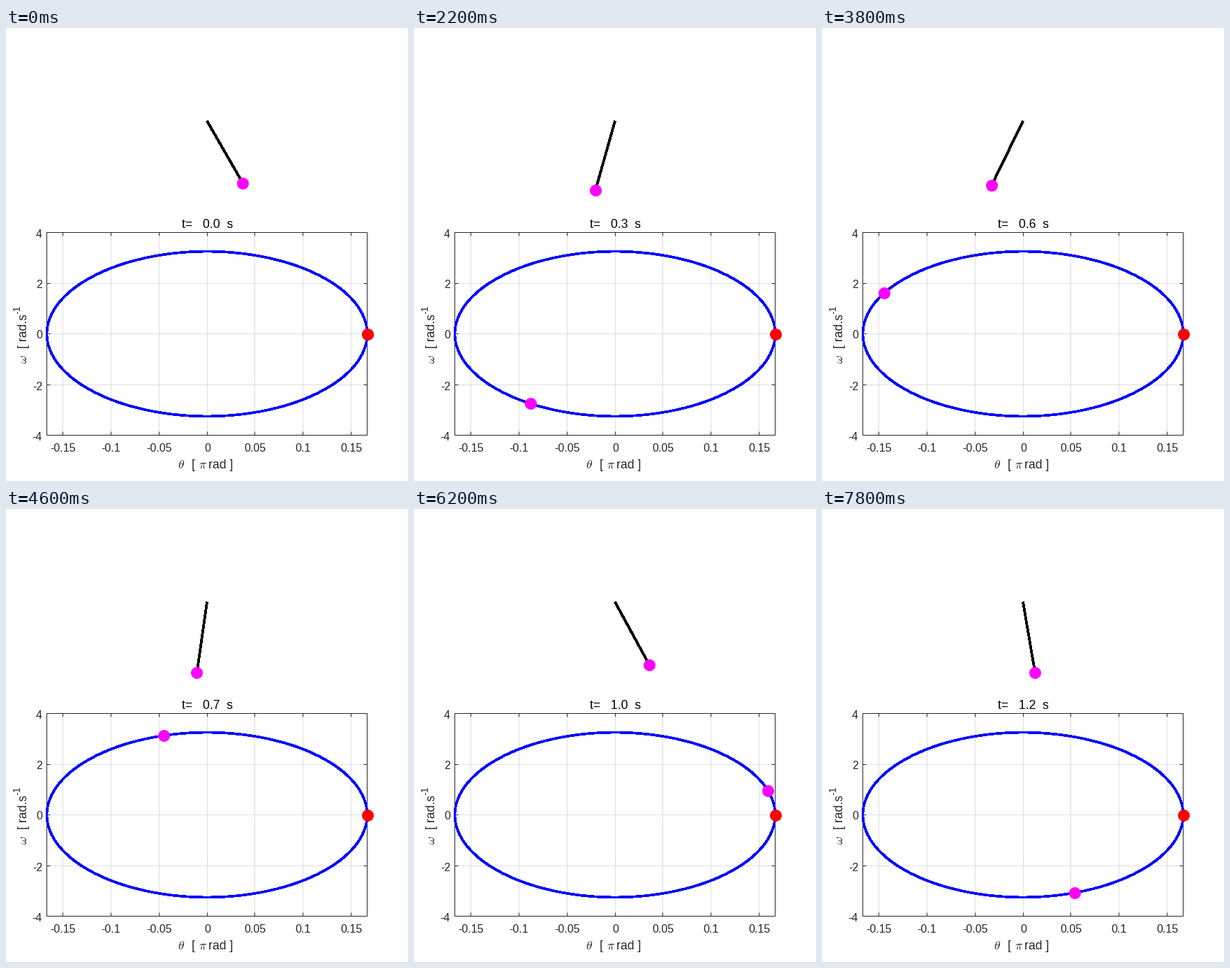
These frames come from a looping animation (576 px wide and 648 px high, 8000 ms). A matplotlib script:

```python
import math

import matplotlib.pyplot as plt
import numpy as np
from matplotlib.animation import FuncAnimation

W, H, DPI = 576, 648, 100
PX = 72 / DPI                      # points per pixel
FRAMES, INTERVAL = 40, 200
DT, SUB = 1 / 32, 40               # simulated seconds per frame, solver substeps
W0 = 2 * math.pi
AMP = math.pi / 6

LEFT, RIGHT, TOP, BOTTOM = 58, 517, 292, 582
CX, CY = (LEFT + RIGHT) / 2, (TOP + BOTTOM) / 2
X_UNIT = (RIGHT - LEFT) * 3        # pixels per pi rad
Y_UNIT = (BOTTOM - TOP) / 8        # pixels per rad/s
PIVOT, ROD = (CX, 132.5), 102.5
INK, GRID, MAGENTA = "#262626", "#dedede", "#ff00ff"

plt.rcParams["font.family"] = "Liberation Sans"
plt.rcParams["mathtext.fontset"] = "cm"


def swing():
    """Angle and angular speed of the pendulum at every frame (RK4)."""
    def rate(s):
        return np.array([s[1], -W0 ** 2 * math.sin(s[0])])

    s, h, path = np.array([AMP, 0.0]), DT / SUB, []
    for _ in range(FRAMES):
        path.append(s)
        for _ in range(SUB):
            a = rate(s)
            b = rate(s + h / 2 * a)
            c = rate(s + h / 2 * b)
            d = rate(s + h * c)
            s = s + h / 6 * (a + 2 * b + 2 * c + d)
    return path


def phase_xy(theta, omega):
    return CX + theta / math.pi * X_UNIT, CY - omega * Y_UNIT


def pixel(v):
    return math.floor(v + 0.5)


# Whole coordinates are pixel centres
fig = plt.figure(figsize=(W / DPI, H / DPI), dpi=DPI, facecolor="white")
ax = fig.add_axes([0, 0, 1, 1])
ax.set_xlim(-0.5, W - 0.5)
ax.set_ylim(H - 0.5, -0.5)
ax.axis("off")


def line(xs, ys, color=INK, width=1.0, z=1, **kw):
    return ax.plot(xs, ys, color=color, lw=width * PX, zorder=z,
                   clip_on=False, snap=False, **kw)[0]


def dot(x, y, color, z):
    return ax.plot([x], [y], "o", ms=17 * PX, mfc=color, mec="none", zorder=z,
                   clip_on=False, snap=False, antialiased=False)[0]


def label(x, y, s, size=17.6, color=INK, ha="left", rot=0):
    return ax.text(x, y, s, fontsize=size * PX, color=color, ha=ha,
                   va="baseline", rotation=rot, rotation_mode="anchor")


# Grid, ticks and tick labels
TICK = 4.5
for k in range(-3, 4):
    x = pixel(CX + k * 0.05 * X_UNIT)
    line([x, x], [TOP, BOTTOM], GRID, z=0)
    line([x, x], [BOTTOM, BOTTOM - TICK])
    line([x, x], [TOP, TOP + TICK])
    label(x, 606, f"{k * 0.05:.2f}".rstrip("0").rstrip(".") if k else "0",
          16, ha="center")
for v in range(-4, 5, 2):
    y = pixel(CY - v * Y_UNIT)
    if abs(v) < 4:
        line([LEFT, RIGHT], [y, y], GRID, z=0)
        line([LEFT, LEFT + TICK], [y, y])
        line([RIGHT, RIGHT - TICK], [y, y])
    label(51.5, y + 7, str(v), 16, ha="right")
line([LEFT, RIGHT, RIGHT, LEFT, LEFT], [TOP, TOP, BOTTOM, BOTTOM, TOP],
     solid_joinstyle="miter")

# Axis labels
label(245.5, 629, r"$\theta$")
label(265, 629, "[")
label(275, 629, r"$\pi$")
label(290, 629, "rad ]")
label(29, 479, r"$\omega$", rot=90)
label(29, 458, "[ rad.s", rot=90)
label(20, 408.5, "-1", 14, rot=90)

# Closed phase curve from energy conservation
th = AMP * np.cos(np.linspace(0, 2 * np.pi, 721))
speed = W0 * np.sqrt(np.maximum(2 * (np.cos(th) - math.cos(AMP)), 0))
speed[361:] *= -1
line(*phase_xy(th, speed), color="#0000ff", width=2.67, z=2,
     antialiased=False)

title = label(288, 285, "", color="black", ha="center")
rod = line([], [], "black", 2.67, 3, solid_capstyle="butt", antialiased=False)
bob = dot(0, 0, MAGENTA, 4)
state = dot(0, 0, MAGENTA, 4)
dot(*phase_xy(AMP, 0), "#ff0000", 5)

path = swing()


def update(i):
    theta, omega = path[i]
    x = PIVOT[0] + ROD * math.sin(theta)
    y = PIVOT[1] + ROD * math.cos(theta)
    rod.set_data([PIVOT[0], x], [PIVOT[1], y])
    bob.set_data([x], [y])
    px, py = phase_xy(theta, omega)
    state.set_data([px], [py])
    title.set_text(f"t=   {i * DT:.1f}  s")
    return rod, bob, state, title


anim = FuncAnimation(fig, update, frames=FRAMES, interval=INTERVAL,
                     init_func=lambda: update(0), repeat=True, repeat_delay=0)
plt.show()
```
